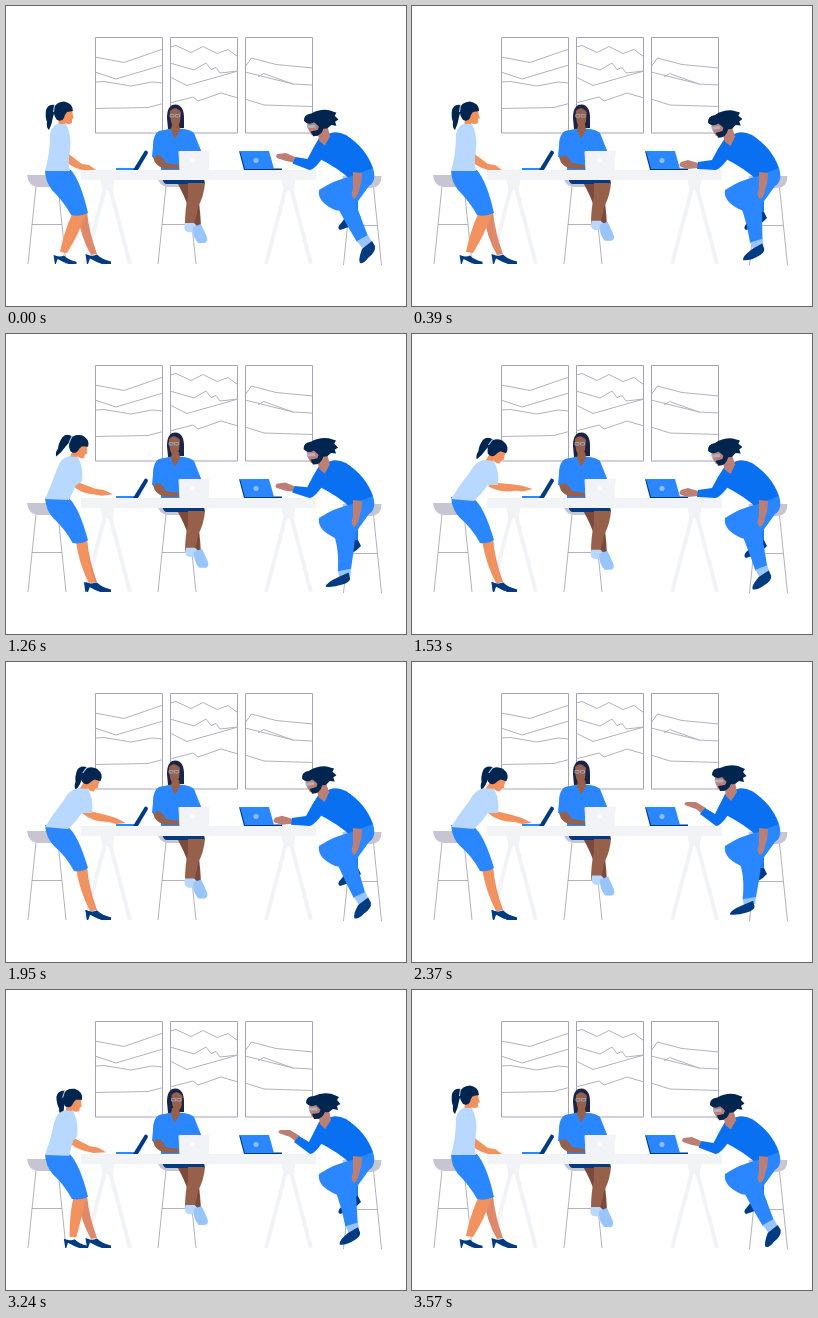
Recreate the animation shown at these times as an HTML page. Size 400 by 300 pixels, loop 3600 ms.

```html
<!DOCTYPE html>
<html lang="en">
<head>
<meta charset="utf-8">
<title>Desk meeting</title>
<style>
  html, body { margin: 0; width: 100%; height: 100%; overflow: hidden; background: #fff; }
  svg { display: block; width: 400px; height: 300px; }
  .line { fill: none; stroke: #b3b1c0; }
  .seat { fill: #c6c5d1; }
  .table { fill: #f2f3f6; stroke: #f2f3f6; }
  .blue { fill: #2a87ff; }
  .shirt { fill: #0a70f2; }
  .pale { fill: #b9d8ff; }
  .sneaker { fill: #98c5ff; }
  .navy { fill: #003b82; }
  .hair { fill: #00264f; }
  .peach { fill: #f1925f; }
  .brown { fill: #96604a; }
  .umber { fill: #7b4a3a; }
  .rose { fill: #bd7f74; }
</style>
</head>
<body>
<svg viewBox="0 0 400 300">
  <!-- wall panels -->
  <g class="line">
    <path d="M89.5 31.5h67v95.500h-67zM164.5 31.5h67v95.500h-67zM239.5 31.5h67v95.500h-67z" stroke="#a5a3b3"/>
    <path d="M89 51L118 56.500 157 43M89 66L110 73 157 59M89 76L98 75.500 125 80 146 76 157 77M89 102.500L142 101.500 157 97.500"/>
    <path d="M164 41L170 39.500 185 46.500 197 40.500 211 47.500 222 43.500 232 51M164 57L188 64 200 57 205 63.500 210 61.500 214 67 232 65M164 71L181 79.500 232 65M164 97L187 91 192 95 215 87 232 92"/>
    <path d="M239 61L245.500 52 270 58.500 307 62M239 66L287 78 307 79M252 71L257.500 67.500 287 78M239 93L258 99 307 100.500"/>
  </g>

  <!-- stools -->
  <g id="stool">
    <path class="line" d="M30 180L22 258M52 180L60 258M26 218.500H56"/>
    <path class="seat" d="M21 169H60Q60 180 50 181H32Q22 180 21 169Z"/>
  </g>
  <use href="#stool" x="130"/>
  <use href="#stool" x="315.500" y="1"/>

  <!-- seated woman -->
  <path class="navy" d="M157 172H198L199 178H160Q156 176 157 172Z"/>
  <path class="umber" d="M172 178L190 178Q194 198 195 220L187 220Q184 200 172 178Z"/>
  <path class="brown" d="M182 177L199 177Q198 190 192 201Q191 208 188 218L179 218Q179 203 182 190Z"/>
  <g id="sneakers">
    <path class="pale" d="M179 217L188 217L193 222Q191 226 184 226.500Q176 226 179 217Z"/>
    <path class="sneaker" d="M187 221L195 218L200 229Q203 235 199 237H192Q186 230 187 221Z"/>
  </g>
  <path class="blue" d="M163 123L153 125Q147 128 147 140L146 151L155 152V166H190L196 147L188 127Q185 124 178 123Z"/>
  <path class="brown" d="M147 151L154 149L160 157L173 159V163H160Q149 161 147 151Z"/>
  <path d="M161 112Q161 98.500 169.500 98.500Q178 99 178 112V122L162 123Z" fill="#1b2346"/>
  <path class="brown" d="M166 118H173L174 124L169 133L165 124Z"/>
  <g id="face">
    <path class="brown" d="M163 105Q168 99 174 106L173 116Q171 122 167 121Q163 118 163 105Z"/>
    <path d="M163 108.500h4v2.500h-4zM168.500 108.500h4v2.500h-4z" fill="none" stroke="#9fb0cc" stroke-width=".8"/>
  </g>

  <!-- table -->
  <g class="table">
    <rect x="75" y="164" width="235" height="10" stroke="none"/>
    <g id="trestle">
      <path d="M95 174H108L106 184H97Z"/>
      <path d="M100 178L79 258M103 178L124 258" stroke-width="4"/>
    </g>
    <use href="#trestle" x="181"/>
  </g>

  <!-- laptops -->
  <path class="table" d="M173 145.500H203L202 164H174Z" stroke="none"/>
  <circle cx="187" cy="154" r="2" fill="#fff"/>
  <path class="blue" d="M110 162H130V164H110Z"/>
  <path class="navy" d="M139 144.500Q142 144 142 147L132 164H127Z"/>
  <path class="navy" d="M233 145L238 164H276V162.500H268Z"/>
  <path class="blue" d="M234 145H263L268 163H239Z"/>
  <circle cx="250" cy="154.500" r="2.500" fill="#8fbfff"/>

  <!-- standing woman -->
  <path d="M71 207L81 206Q83 226 91 248L85 249Q75 232 71 207Z" fill="#de8a6a"/>
  <path class="navy" id="shoe" d="M79.500 248L84 249.500Q89 250 91 248.500Q96 253.500 105 255.500V258H96Q90 256 84 252.500L82 258H81Z"/>
  <path class="peach" data-by="step"
    d="M66 208L80 207Q73 228 61 247L54 246Q58 226 66 208Z"
    data-to="M70 207L81 206Q82 225 90 248L84 249Q74 230 70 207Z"/>
  <g id="backShoe"><use href="#shoe"/></g>
  <path class="blue" data-by="lean"
    d="M39 164L65 164Q75 176 82 207Q74 211 65 209Q58 196 46 184Q39 175 39 164Z"
    data-to="M39 163L61 164Q72 172 82 206Q76 210 68 209Q60 194 48 184Q40 176 39 163Z"/>
  <g id="head">
    <path class="hair" id="pony" d="M49 99Q42 98 40 104Q39 111 41 116Q40 121 43 124Q46 118 47 111L49 104Z"/>
    <path class="peach" d="M55 103L66 104L67 110L68 112L66 113V117Q62 119 59 117L60 122L52 122Q53 114 53 108Z"/>
    <path class="hair" d="M48 103Q49 96 58 95.500Q67 97 67 105L61 106Q59 108 58 112Q56 116 51 114Q47 109 48 103Z"/>
    <path d="M48.500 99L47.500 106" stroke="#b9d8ff"/>
  </g>
  <g id="forearm">
    <path class="peach" data-by="lean"
      d="M55 148L60 146L76 158L83 159L90 164L76 164L70 162Q58 157 55 148Z"
      data-to="M76 151L84 149L100 153L110 156L120 161L110 162L103 160Q86 160 76 151Z"/>
  </g>
  <path class="pale" data-by="lean"
    d="M52 118Q46 119 44 128Q44 148 39 165L64 165Q62 158 63 151L64 144Q66 130 60 118Z"
    data-to="M72 126Q63 128 58 138Q47 152 39 165L62 167Q70 160 76 151L86 151Q88 138 82 127Z"/>

  <!-- man -->
  <path d="M352 186V207H343L337 190Z" fill="#1f7cf2"/>
  <path class="navy" d="M343 206H352L355 212Q348 220 334 224Q330 222 336 216Z"/>
  <path class="shirt" d="M319 130Q328 123 340 129Q360 142 367 162L357 174H345Q332 162 312 152Z"/>
  <path class="blue" data-by="swing"
    d="M326 200L333 204Q341 220 351 236L362 230Q356 215 350 198Q346 188 340 182Z"
    data-to="M326 198L328 206Q330 220 324 238L338 238Q344 222 349 203Q350 190 340 182Z"/>
  <path class="sneaker" data-by="swing"
    d="M351 235L362 229L366 236L357 243Z"
    data-to="M324 238L338 237L336 244L324 244Z"/>
  <path class="navy" data-by="swing"
    d="M356 243L366 235L369 240Q370 246 362 252Q358 258 354 257Q352 254 356 243Z"
    data-to="M323 243L333 240L334 246Q334 249 326 250Q314 252 306 251Q306 247 323 243Z"/>
  <path class="blue" d="M367 162Q371 175 363 180L350 198Q340 207 329 204Q311 196 313 184Q328 174 346 170Z"/>
  <path class="rose" d="M347 166L356 167Q356 176 353 184Q352 191 348 193Q344 190 347 182Z"/>
  <path class="rose" data-by="lift"
    d="M286 157L286 162L276 163L269 161Q266 159 269 156L276 154Z"
    data-to="M294 146L289 151L284 147L274 143.5Q271 142 274 140L284 140Z"/>
  <path class="shirt" data-by="lift"
    d="M321 130L318 150Q308 164 303 164L285 163L286 156L300 154Q306 142 313 132Z"
    data-to="M321 130L318 150Q309 164 304 164L288 152L293 146L303 152Q308 142 313 132Z"/>
  <g id="manHead">
    <path class="rose" d="M312 122L323 120L325 130L319 139L314 134Z"/>
    <path class="rose" d="M303 114L317 113L318 124L313 129L306 127L303 120Z"/>
    <path class="hair" d="M306 124L313 123L316 117L319 122Q316 130 308 129Z"/>
    <path d="M302.500 117.500H311V120.500H303Z" fill="#a9b4c6"/>
    <path class="hair" d="M300 113Q300 106 308 106Q316 102 326 104L333 107L331 110L334.500 114L331 116L332 120L327 119L323 122Q316 123 313 118L310 115Q304 118 300 113Z"/>
  </g>
</svg>
<script>
const LOOP = 3600;
const $ = id => document.getElementById(id);
const place = (id, transform) => $(id).setAttribute('transform', transform);
const ease = x => x < .5 ? 4 * x ** 3 : 1 - 4 * (1 - x) ** 3;

// Eased value at time t from [time, value] stops.
function track(t, ...stops) {
  const i = stops.findIndex(s => s[0] > t);
  if (i === 0) return stops[0][1];
  if (i < 0) return stops[stops.length - 1][1];
  const [t0, a] = stops[i - 1], [t1, b] = stops[i];
  return a + (b - a) * ease((t - t0) / (t1 - t0));
}

const numbers = /\d+(\.\d+)?/g;
const morphs = [...document.querySelectorAll('[data-to]')].map(el => ({
  el, from: el.getAttribute('d'), to: el.dataset.to.match(numbers), by: el.dataset.by
}));

function draw(t) {
  const pose = {
    swing: ((1 - Math.cos(t / 900 * Math.PI)) / 2) ** .8,
    lean: track(t, [880, 0], [1620, 1], [2900, 1], [3500, 0]),
    step: track(t, [800, 0], [1400, 1], [2900, 1], [3500, 0]),
    lift: track(t, [0, .5], [250, 0], [500, 0], [850, 1], [1100, 1], [1400, 0],
      [1900, 0], [2250, 1], [3200, 1], [3600, .5])
  };
  const { swing, lean, step, lift } = pose;
  for (const { el, from, to, by } of morphs) {
    let i = 0;
    el.setAttribute('d', from.replace(numbers, n => +n + (to[i++] - n) * pose[by]));
  }

  const tap = track(t, [1500, 1], [1800, 0], [2600, 0], [2850, 1]);
  const pony = track(t, [900, 0], [1350, 20], [1530, 14], [1750, 0], [3000, 0], [3250, -12], [3560, 0]);
  const look = track(t, [0, .4], [390, .3], [700, 0], [2300, 0], [2800, 1], [3200, 1], [3600, .4]);

  place('head', `translate(${28 * lean} ${10 * lean}) rotate(${28 * lean} 58 106)`);
  place('pony', `rotate(${pony - 16 * lean} 48 101)`);
  place('forearm', `rotate(${-9 * tap * lean} 82 152)`);
  place('backShoe', `translate(${-24 * (1 - step)} ${25.8 * (1 - step)}) scale(${.9 + .1 * step})`);
  place('sneakers', `translate(${1.5 * swing} ${-4.5 * swing})`);
  place('face', `translate(${2.5 * look} 0)`);
  place('manHead', `translate(${-2 * (1 - lift)} ${1 - lift}) rotate(${-8 * (1 - lift)} 320 128)`);
}

const start = performance.now();
(function frame() {
  draw((performance.now() - start) % LOOP);
  requestAnimationFrame(frame);
})();
</script>
</body>
</html>
```
